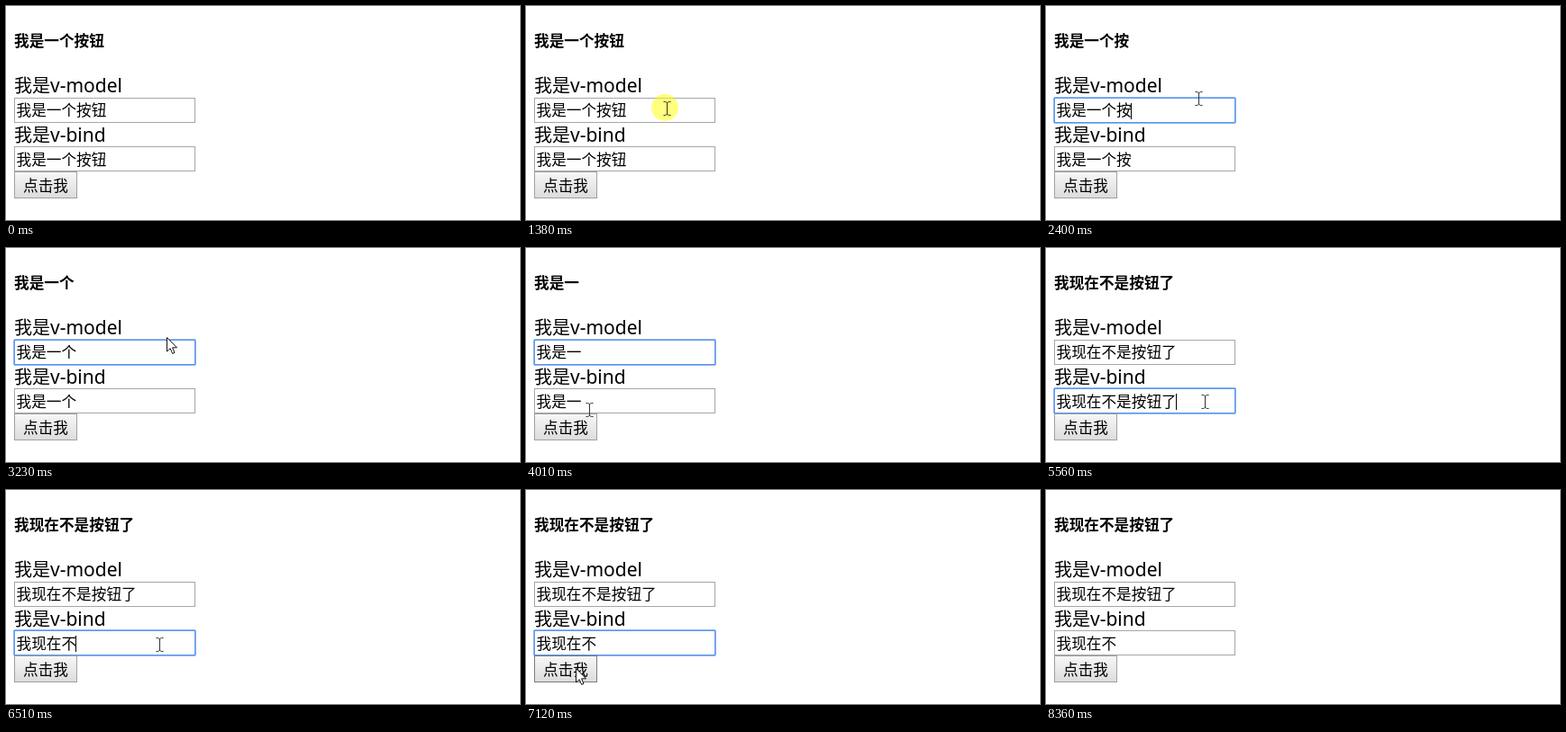
Animation of 570 by 238 pixels, one loop 9140 ms. Source, as an HTML page:

```html
<!DOCTYPE html>
<html lang="zh-CN">
<head>
<meta charset="utf-8">
<title>v-model / v-bind</title>
<style>
html, body { margin: 0; width: 100%; height: 100%; overflow: hidden; background: #fff; }
svg { display: block; }
text { font-family: "Noto Sans CJK SC", "Noto Sans CJK", sans-serif; font-size: 16.67px; fill: #000; white-space: pre; }
.label { font-size: 20px; }
.latin { font-family: "Noto Sans", sans-serif; font-size: 21px; }
</style>
</head>
<body>
<svg width="570" height="238" viewBox="0 0 570 238">
  <defs>
    <linearGradient id="idle" x2="0" y2="1">
      <stop stop-color="#f7f7f7"/><stop offset="1" stop-color="#dcdcdc"/>
    </linearGradient>
    <linearGradient id="down" x2="0" y2="1">
      <stop stop-color="#dedede"/><stop offset="1" stop-color="#f0f0f0"/>
    </linearGradient>
    <g id="field">
      <rect x="9.5" y=".5" width="200" height="27" fill="#fff" stroke="#a6a6a6"/>
    </g>
    <g id="ring" fill="none">
      <rect x="8.5" y="-.5" width="202" height="29" rx="1.5" stroke="#8db6f3"/>
      <rect x="9.5" y=".5" width="200" height="27" stroke="#5c96ea"/>
    </g>
  </defs>
  <rect width="570" height="238" fill="#fff"/>
  <text id="title" x="9" y="44.5" font-weight="700"></text>
  <text class="label" x="9" y="96">我是</text><text class="latin" x="49" y="96">v-model</text>
  <text class="label" x="9" y="151">我是</text><text class="latin" x="49" y="151">v-bind</text>
  <use href="#field" y="102"/><use id="ring1" href="#ring" y="102"/>
  <text id="text1" x="11.5" y="122.3"></text>
  <use href="#field" y="156"/><use id="ring2" href="#ring" y="156"/>
  <text id="text2" x="11.5" y="177.3"></text>
  <rect id="caret" width="1" height="18"/>
  <rect id="button" x="9.5" y="184.5" width="69" height="29"/>
  <text x="19" y="206.3">点击我</text>
  <circle id="halo" r="15" fill="#ff0" fill-opacity=".5"/>
  <path id="arrow" d="M.5 .5V16L4.2 12.7L6.6 18.4L9 17.4L6.6 11.8H11.5Z" fill="#fff" stroke="#111"/>
  <path id="beam" d="M-3.5 -7.5H-1.5L.5 -6.5L2.5 -7.5H4.5M.5 -6.5V6.5M-3.5 7.5H-1.5L.5 6.5L2.5 7.5H4.5" fill="none" stroke="#333"/>
</svg>
<script>
const LOOP = 9140, CHAR = 16.67;
const BEFORE = "我是一个按钮", AFTER = "我现在不是按钮了";
const $ = id => document.getElementById(id);

// start, end, number of steps, target x, target y
const moves = [
  [440, 520, 2, 447, 228],
  [670, 977, 5, 175, 98],
  [1053, 1130, 2, 156, 114],
  [1760, 2080, 5, 166, 104],
  [2310, 2690, 6, 178, 99],
  [3460, 4090, 9, 54, 192],
  [4170, 4170, 1, 54, 191],
  [4940, 5260, 5, 176, 171],
  [5710, 5800, 2, 174, 171],
  [5940, 6260, 5, 170, 172],
  [6570, 7120, 8, 55, 198],
  [7890, 8360, 7, 445, 240]
];
const halos = [[1380, 1530], [4410, 4560], [5330, 5560], [7270, 7350]];
const carets = [[1450, 1980], [2390, 2690], [2860, 3080], [3310, 3840], [5410, 6940]];
const cuts1 = [2390, 2860, 3310];
const cuts2 = [5710, 5940, 6110, 6410];
const click = 4560;

const within = (t, spans) => spans.some(([a, b]) => t >= a && t < b);
const cut = (word, t, times) => word.slice(0, word.length - times.filter(c => t >= c).length);
const show = (id, on) => $(id).setAttribute("visibility", on ? "visible" : "hidden");
const place = (id, x, y) => $(id).setAttribute("transform", `translate(${x} ${y})`);
const inBox = (p, x0, y0, x1, y1) => p.x >= x0 && p.x < x1 && p.y >= y0 && p.y < y1;

function pointer(t) {
  let x = 457, y = 238;
  for (const [a, b, n, tx, ty] of moves) {
    if (t < a) break;
    const k = t >= b ? n : Math.floor((t - a) / (b - a) * (n - 1) + 1e-6) + 1;
    const p = k / n, e = p * p * (3 - 2 * p);
    x += (tx - x) * e;
    y += (ty - y) * e;
  }
  return { x: Math.round(x), y: Math.round(y) };
}

function draw(t) {
  const p = pointer(t);
  const visible = t >= 440 && t < 8360;
  const focus1 = t >= 1450 && t < 4410;
  const focus2 = t >= 5410 && t < 7270;
  const msg = t < click ? cut(BEFORE, t, cuts1) : AFTER;
  const bound = t < click ? msg : cut(AFTER, t, cuts2);

  $("title").textContent = msg;
  $("text1").textContent = msg;
  $("text2").textContent = bound;
  show("ring1", focus1);
  show("ring2", focus2);

  show("caret", within(t, carets));
  const count = (focus2 ? bound : msg).length;
  place("caret", Math.floor(11 + CHAR * count), focus2 ? 162 : 108);

  const pressed = within(t, halos);
  const hover = visible && inBox(p, 9, 184, 79, 214);
  $("button").setAttribute("fill", hover && pressed ? "url(#down)" : "url(#idle)");
  $("button").setAttribute("stroke", hover ? "#7c7c7c" : "#a0a0a0");

  const typing = inBox(p, 9, 102, 210, 130) || inBox(p, 9, 156, 210, 184);
  show("beam", visible && typing);
  show("arrow", visible && !typing);
  show("halo", pressed);
  place("beam", p.x, p.y);
  place("arrow", p.x, p.y);
  place("halo", p.x - 2, p.y - 1);
}

const start = performance.now();
function tick() {
  draw((performance.now() - start) % LOOP);
  requestAnimationFrame(tick);
}
tick();
</script>
</body>
</html>
```
